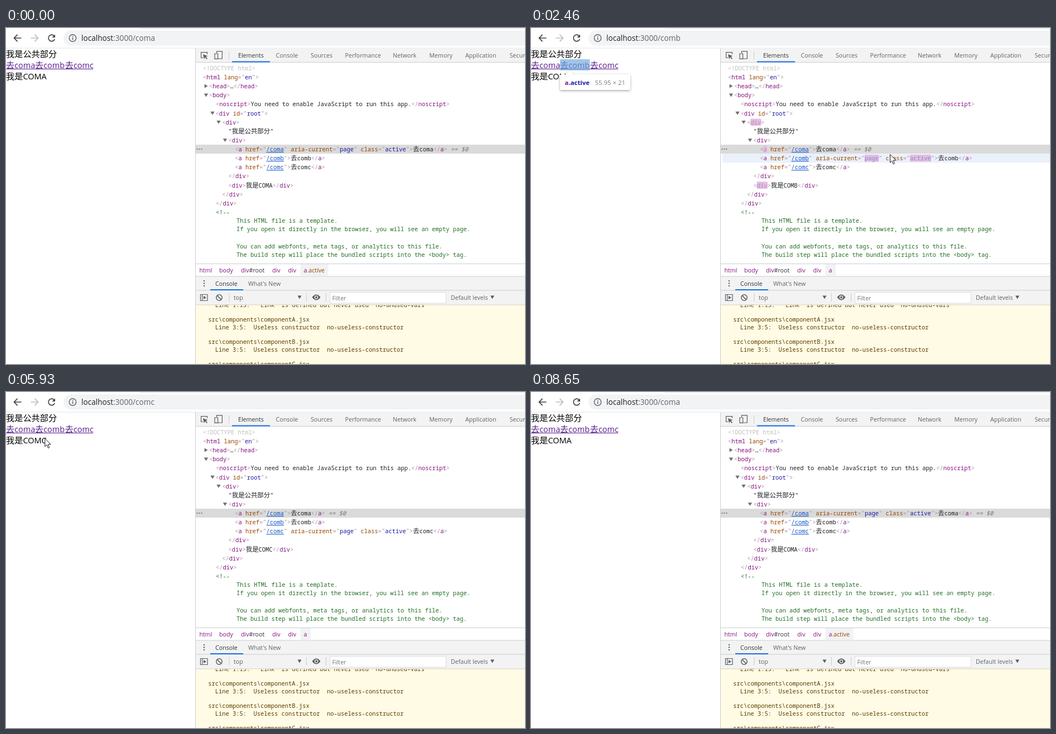
An HTML page for the animation above (9.18 s loop, 930x602 px).

```html
<!DOCTYPE html>
<html lang="en">
<head>
<meta charset="utf-8">
<style>
html, body { margin: 0; width: 100%; height: 100%; overflow: hidden; background: #fff; }
svg { display: block; width: 930px; height: 602px; }
text { white-space: pre; }
.ui { font: 10.65px "Open Sans", "Noto Sans", sans-serif; }
.mono { font: 10.43px "Noto Sans Mono", "DejaVu Sans Mono", monospace; }
.mono .zh { font: 11.4px "Noto Sans CJK SC", "Noto Sans CJK JP", sans-serif; }
.page { font: 14.5px "Open Sans", "Noto Sans", sans-serif; }
.page .zh { font: 15.2px "Noto Sans CJK SC", "Noto Sans CJK JP", sans-serif; }
.tip { font: 11.4px "Open Sans", "Noto Sans", sans-serif; }
</style>
</head>
<body>
<svg viewBox="0 0 930 602">
  <defs>
    <filter id="shade" x="-20%" y="-40%" width="140%" height="200%">
      <feDropShadow dx="0" dy="1.5" stdDeviation="2" flood-opacity=".35"/>
    </filter>
    <clipPath id="log"><rect x="340" y="496.5" width="590" height="106"/></clipPath>
  </defs>
  <g id="still"></g>
  <g id="live"></g>
</svg>
<script>
const LOOP = 9180, STEP = 78, ROW = 16.13;
const C = {
  edge: '#a894a6', tag: '#881280', attr: '#994500', val: '#1a1aa6', link: '#1155cc',
  text: '#202124', note: '#236e25', doc: '#c0c0c0', grey: '#5f6368', icon: '#5a5d61', nav: '#3f4247', warn: '#5c3c00'
};
const PAGES = ['coma', 'comb', 'comc'];

// bursts of movement: first change, last change, number of changes
const BURSTS = [
  [70, 530, 7], [990, 1850, 12], [1910, 2770, 12], [2850, 3540, 10], [3690, 4540, 12], [4610, 5470, 12],
  [5550, 6010, 7], [6160, 6240, 2], [6390, 7240, 12], [7310, 8180, 12], [8260, 8650, 6]
];
// pointer path: time, x, y
const PATH = [
  [70, 920, 577], [300, 560, 425], [530, 212, 258], [990, 190, 229], [1150, 165, 178], [1380, 105, 90],
  [1460, 86, 69], [1910, 88, 74], [2066, 180, 95], [2145, 300, 120], [2223, 400, 150], [2301, 520, 190],
  [2379, 615, 228], [2457, 643, 226], [2770, 690, 231], [3100, 719, 232], [3540, 704, 230], [3690, 700, 228],
  [3767, 540, 175], [3845, 325, 115], [3922, 195, 80], [4000, 148, 68], [4540, 146, 70], [4690, 200, 130],
  [4770, 300, 185], [4845, 390, 212], [4922, 470, 232], [5000, 520, 252], [5470, 640, 249], [5550, 590, 246],
  [5625, 430, 222], [5780, 170, 120], [6010, 19, 64], [6240, 14, 61], [6550, 15, 63], [6700, 130, 125],
  [6855, 360, 190], [6930, 420, 203], [7010, 463, 224], [7240, 540, 219], [7600, 610, 234], [7850, 600, 250],
  [8100, 560, 222], [8180, 555, 220], [8260, 570, 300], [8650, 700, 600]
];
// click time, page opened, anchor that stops being active
const CLICKS = [[1850, 1, 0], [4463, 2, 1], [6544, 0, 2]];

const esc = s => s.replace(/&/g, '&amp;').replace(/</g, '&lt;').replace(/>/g, '&gt;')
  .replace(/[\u4e00-\u9fff]+/g, '<tspan class="zh">$&</tspan>');
const span = (fill, s, more = '') => `<tspan fill="${fill}" ${more}>${esc(s)}</tspan>`;
const text = (cls, x, y, body, more = '') => `<text class="${cls}" x="${x}" y="${y}" ${more}>${body}</text>`;
const label = (x, y, s, fill = C.text, cls = 'ui') => text(cls, x, y, span(fill, s));
const rect = (x, y, w, h, fill, more = '') =>
  `<rect x="${x}" y="${y}" width="${w}" height="${h}" fill="${fill}" ${more}/>`;
const stroke = (d, color = C.icon, w = 1.2) =>
  `<path d="${d}" fill="none" stroke="${color}" stroke-width="${w}"/>`;
const fillPath = (d, color = C.icon) => `<path d="${d}" fill="${color}"/>`;
const down = (x, y, s = 3.5) => fillPath(`M${x - s} ${y - s}h${2 * s}l${-s} ${1.7 * s}z`);
const line = (x, i, body) => text('mono', x, (75.9 + ROW * i).toFixed(2), body);

const attr = (name, val) => span(C.edge, ' ') + span(C.attr, name) + span(C.edge, '="') + val + span(C.edge, '"');
const openWith = (name, rest) => span(C.edge, '<') + name + rest + span(C.edge, '>');
const open = (name, rest = '') => openWith(span(C.tag, name), rest);
const close = name => span(C.edge, '</') + span(C.tag, name) + span(C.edge, '>');

function arrowIcon(x, color, dir) {
  return stroke(`M${x - 6.5 * dir} 18H${x + 6 * dir}M${x + .5 * dir} 11.8L${x + 6.5 * dir} 18L${x + .5 * dir} 24.2`, color, 1.7);
}

function browserBar() {
  return rect(240, 0, 690, 1, '#e3e5e8') +
    arrowIcon(21, C.nav, -1) + arrowIcon(51, '#bcbec2', 1) +
    stroke('M86.2 14A5.8 5.8 0 1 0 87.3 20', C.nav, 1.7) + fillPath('M88 11.5V17H82.5Z', C.nav) +
    rect(103, 4.5, 860, 27, '#f1f3f4', 'rx="13.5"') +
    `<circle cx="119.5" cy="18" r="6.2" fill="none" stroke="${C.grey}" stroke-width="1.4"/>` +
    rect(118.8, 17, 1.5, 4.3, C.grey) + rect(118.8, 14.4, 1.5, 1.6, C.grey) +
    rect(0, 35.5, 930, 1, '#e4e6e8');
}

function panelBars() {
  const tabs = [['Elements', 416], ['Console', 483.5], ['Sources', 546], ['Performance', 607.5],
    ['Network', 693], ['Memory', 758.5], ['Application', 823], ['Security', 902.5]];
  const rule = '#cacdd1';
  let s = rect(340, 36.5, 590, 25, '#f3f3f3') + rect(340, 61, 590, 1, rule) + rect(405, 59.5, 68, 2, '#1a73e8');
  tabs.forEach(([name, x], i) => s += label(x, 53, name, i ? C.grey : '#333'));
  s += stroke('M353 53.5H349.6V43.6H360.5V47') + fillPath('M353 47L361.5 50.2L358 51.4L361 54.8L359.8 56L356.6 52.6L355 56Z') +
    stroke('M377.5 45V41.8H387.4V55H380M374 46H379.6V55.4H374Z') + rect(399, 42, 1, 14, '#ccc');
  s += rect(340, 422, 590, 1, rule) + rect(340, 445, 590, 51, '#f3f3f3') + rect(340, 444.5, 590, 1, rule) +
    rect(340, 469.5, 590, 1, rule) + rect(366, 468, 59, 2, '#1a73e8') +
    label(375, 461.5, 'Console', '#333') + label(434, 461.5, "What's New", C.grey);
  for (const y of [453, 457.5, 462]) s += `<circle cx="355" cy="${y}" r="1.2" fill="${C.icon}"/>`;
  s += stroke('M348.5 477.5H361V488.5H348.5ZM351.8 477.5V488.5') + fillPath('M354 480L359 483L354 486Z') +
    `<circle cx="382" cy="483" r="5.2" fill="none" stroke="${C.icon}" stroke-width="1.5"/>` + stroke('M378.4 479.4L385.6 486.6', C.icon, 1.5);
  for (const x of [399.5, 538, 573]) s += rect(x, 475, 1, 15, '#ccc');
  s += label(408, 487, 'top', C.grey) + down(526, 483) +
    fillPath('M548.5 482.5Q556 472.5 563.5 482.5Q556 492.5 548.5 482.5Z') +
    '<circle cx="556" cy="482.5" r="3.3" fill="#f3f3f3"/>' + `<circle cx="556" cy="482.5" r="1.9" fill="${C.icon}"/>` +
    rect(580.5, 473.5, 208, 19.5, '#fff', 'stroke="#dcdcdc"') + label(584.5, 487.5, 'Filter', '#757575') +
    label(797, 487, 'Default levels', C.grey) + down(871.5, 483);
  return s;
}

function consoleLog() {
  const rows = ["  Line 1:15:  'Link' is defined but never used  no-unused-vars", ''];
  for (const n of 'ABC') rows.push(`src\\components\\component${n}.jsx`, '  Line 3:5:  Useless constructor  no-useless-constructor', '');
  return rect(340, 496, 590, 106, '#fffbe5') + rect(340, 495.5, 590, 1, '#d6d3c4') + '<g clip-path="url(#log)">' +
    rows.map((r, i) => label(362.3, (499.7 + 13.3 * i).toFixed(2), r, C.warn, 'mono')).join('') + '</g>';
}

function fixedTree() {
  const right = i => fillPath(`M355.7 ${68.3 + ROW * i}l5.8 3.5l-5.8 3.5z`, '#6e6e6e');
  const fold = (x, i) => fillPath(`M${x - 3.7} ${69.2 + ROW * i}h7.4l-3.7 5.8z`, '#6e6e6e');
  const note = (y, s) => label(413, y, s, C.note, 'mono');
  return line(353, 0, span(C.doc, '<!DOCTYPE html>')) +
    line(353, 1, open('html', attr('lang', span(C.val, 'en')))) +
    right(2) + line(364, 2, open('head') + span(C.text, '…') + close('head')) +
    fold(358.5, 3) + line(364, 3, open('body')) +
    line(376, 4, open('noscript') + span(C.text, 'You need to enable JavaScript to run this app.') + close('noscript')) +
    fold(370, 5) + line(375.5, 5, open('div', attr('id', span(C.val, 'root')))) +
    fold(381, 6) + line(398.5, 7, span(C.text, '"我是公共部分"')) +
    fold(392.5, 8) + line(398.5, 8, open('div')) +
    line(398.5, 12, close('div')) + line(387.3, 14, close('div')) + line(376, 15, close('div')) +
    line(376, 16, span(C.note, '<!--')) +
    note(349, 'This HTML file is a template.') +
    note(364.3, 'If you open it directly in the browser, you will see an empty page.') +
    note(394.8, 'You can add webfonts, meta tags, or analytics to this file.') +
    note(410, 'The build step will place the bundled scripts into the <body> tag.');
}

// the picture only moves at the steps of each burst
function snap(t) {
  let q = 0;
  for (const [a, b, n] of BURSTS) {
    if (t < a) break;
    const d = (b - a) / (n - 1);
    q = Math.min(b, a + Math.floor((t - a) / d + .2) * d);
  }
  return q;
}

function pointer(t) {
  const i = PATH.findIndex(p => p[0] > t);
  if (i <= 0) return PATH[i ? PATH.length - 1 : 0].slice(1);
  const [t0, x0, y0] = PATH[i - 1], [t1, x1, y1] = PATH[i], k = (t - t0) / (t1 - t0);
  return [x0 + (x1 - x0) * k, y0 + (y1 - y0) * k];
}

function rowAt(t) {
  const [x, y] = pointer(t);
  return x > 343 && y > 64 && y < 322 ? Math.floor((y - 64) / ROW) : -1;
}

const rgb = s => [1, 3, 5].map(i => parseInt(s.slice(i, i + 2), 16));
const mix = (a, b, k) => `rgb(${rgb(a).map((v, i) => Math.round(v + (rgb(b)[i] - v) * k))})`;

// cubic-bezier(0, 0, .2, 1)
function easeOut(u) {
  let lo = 0, hi = 1;
  for (let i = 0; i < 20; i++) {
    const s = (lo + hi) / 2;
    if (.6 * s * s + .4 * s ** 3 < u) lo = s; else hi = s;
  }
  return 3 * lo * lo - 2 * lo ** 3;
}

// deep purple at first, fading out over the row behind it
const flashColor = u => mix('#9e3699', '#f6e4f5', easeOut(u));

function overlay(row) {
  const all = [0, 36, 339, 61];
  const boxes = {
    1: [all, 'html', '', '357 × 63'], 3: [all, 'body', '', '357 × 63'],
    5: [all, 'div', '#root', '357 × 63'], 6: [all, 'div', '', '357 × 63'],
    7: [[0, 36, 91, 20], '#text', '', '95.97 × 21'], 8: [[0, 56, 339, 20], 'div', '', '357 × 21'],
    9: [[0, 56, 52, 20], 'a', '', '54.97 × 21'], 10: [[52, 56, 53.5, 20], 'a', '', '55.95 × 21'],
    11: [[105.5, 56, 50.5, 20], 'a', '', '53.53 × 21'], 13: [[0, 76, 339, 20], 'div', '', '357 × 21']
  };
  return boxes[{ 12: 8, 14: 6, 15: 5 }[row] || row];
}

function drawOverlay(row, page) {
  const o = overlay(row);
  if (!o) return '';
  const [[x, y, w, h], tag, id, size] = o, extra = row - 9 === page ? '.active' : id;
  const left = Math.max(2, x), top = y + h + 7;
  const width = Math.max(95.5, 26 + (tag + extra).length * 5.6 + size.length * 5.5);
  return rect(x, y, w, h, 'rgba(111,168,220,.66)') +
    `<g filter="url(#shade)"><path d="M${left + 10} ${top + 1}l8 -7.5l8 7.5z" fill="#fff"/>` +
    rect(left, top, width, 28, '#fff', 'rx="2.5"') + '</g>' +
    text('tip', left + 8.5, top + 19, span(C.tag, tag) + span(C.val, extra), 'style="font-weight:700"') +
    text('tip', left + width - 8.7, top + 19, span('#7d7d7d', size), 'text-anchor="end"');
}

function drawPointer(x, y) {
  const hand = y >= 57 && y < 78 && x < 157;
  const d = hand
    ? 'M-2 1.5Q-2 0 -.2 0T1.7 1.5V7.5Q3 6.5 4.5 8Q6 7 7 8.6Q9 8 9 10.5V15Q9 18 7 19.5V22H-2V20L-6.5 13.5Q-7.5 11 -5 11.2L-2 13.5Z'
    : 'M.5 .5V15.2L3.8 12L6.2 17.8L8.5 16.8L6.1 11.2H10.8Z';
  return `<path d="${d}" transform="translate(${x.toFixed(1)} ${y.toFixed(1)})" fill="#fff" stroke="#1c1c1c" stroke-linejoin="round"/>`;
}

function drawPage(page, press, row) {
  let s = text('ui', 135, 22.8, span(C.text, 'localhost') + span(C.grey, ':3000/' + PAGES[page]), 'style="font-size:13.65px"') +
    label(0, 52.3, '我是公共部分', '#000', 'page') + label(0, 92.2, '我是COM' + 'ABC'[page], '#000', 'page');
  PAGES.forEach((p, i) => {
    const x = [0, 52, 105.7][i], c = press === i ? '#ff0000' : '#551a8b';
    s += label(x, 72.2, '去' + p, c, 'page') + rect(x, 73, [52, 53.7, 50.5][i], 1, c);
  });
  return s + drawOverlay(row, page);
}

function drawBands(row) {
  let s = rect(340, 209.1, 590, 16, '#dadada');
  if (row >= 0 && row !== 9) s += rect(343, 225.3 + ROW * (row - 10), 600, 16, '#ebf1fb', 'rx="3"');
  for (const x of [342.5, 346.5, 350.5]) s += `<circle cx="${x}" cy="217" r="1.1" fill="#6e6e6e"/>`;
  return s;
}

function drawNodes(page, was, u) {
  const hot = u < 1;
  const glow = (color, s, on = true) => span(on && hot ? mix('#ffffff', color, u ** .8) : color, s);
  const patch = (x, i, n) => hot
    ? rect(x - .3, 65.6 + ROW * i, n * 6.26 + .6, 12.6, flashColor(u), `rx="1.5" opacity="${Math.min(1, (1 - u) * 5)}"`) : '';
  const div = () => openWith(glow(C.tag, 'div'), '');
  let s = patch(393.5, 6, 3) + line(387.3, 6, div());
  PAGES.forEach((p, i) => {
    const r = 9 + i, on = page === i;
    if (was === i) s += patch(416.4, r, 1);
    if (on) s += patch(598, r, 4) + patch(679.3, r, 6);
    let rest = attr('href', span(C.link, '/' + p, 'text-decoration="underline"'));
    if (on) rest += attr('aria-current', glow(C.val, 'page')) + attr('class', glow(C.val, 'active'));
    s += line(410.2, r, openWith(glow(C.tag, 'a', was === i), rest) + span(C.text, '去' + p) + close('a') +
      (i ? '' : span('#777', ' == $0', 'font-style="italic"')));
  });
  return s + patch(404.8, 13, 3) + line(398.5, 13, div() + span(C.text, '我是COM' + 'ABC'[page]) + close('div'));
}

function drawCrumbs(page) {
  const crumb = (x, a, b = '', c = C.text) => text('ui', x, 438, span(C.tag, a) + span(c, b));
  return rect(527.5, 423, page ? 18.5 : 50, 21.5, '#f1f2f3') + crumb(346.5, 'html') + crumb(382, 'body') +
    crumb(421, 'div', '#root', '#303040') + crumb(477, 'div') + crumb(505.5, 'div') +
    crumb(533.5, 'a', page ? '' : '.active', C.attr);
}

const tree = fixedTree();

function draw(q) {
  let page = 0, was = -1, press = -1, u = 1;
  for (const [time, to, from] of CLICKS) {
    if (q >= time - 5) {
      page = to;
      was = from;
      u = Math.max(0, (q - time) / 1400);
    } else if (q >= time - STEP - 5) press = to;
  }
  const busy = q > 1900 && q < 8200;
  const row = busy ? rowAt(q) : -1, lit = busy ? rowAt(q - STEP) : -1; // the page highlight lags one step
  return drawPage(page, press, lit) + drawBands(row) + tree + drawNodes(page, was, u) + drawCrumbs(page) +
    (q >= 70 && q < 8645 ? drawPointer(...pointer(q)) : '');
}

const live = document.getElementById('live');
document.getElementById('still').innerHTML = rect(0, 0, 930, 602, '#fff') + browserBar() +
  rect(339, 36, 1, 566, '#cacdd1') + panelBars() + consoleLog();

let shown = -1;
const start = performance.now();
function tick() {
  const q = snap((performance.now() - start) % LOOP);
  if (q !== shown) live.innerHTML = draw(shown = q);
  requestAnimationFrame(tick);
}
tick();
</script>
</body>
</html>
```
